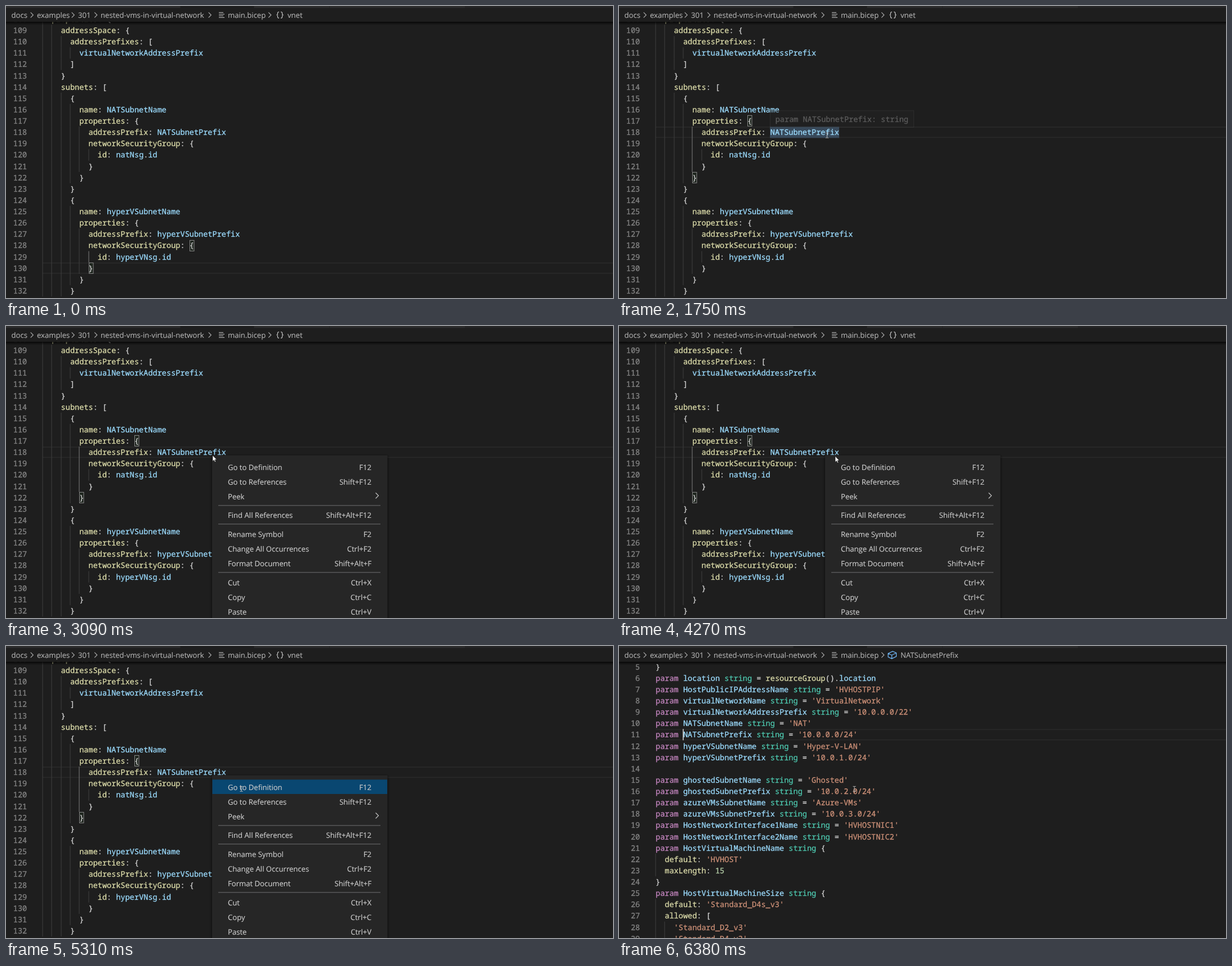
These frames come from a looping animation (1078x519 px, 6870 ms). An HTML page:

```html
<!DOCTYPE html>
<html lang="en">
<head>
<meta charset="utf-8">
<title>Go to definition</title>
<style>
  html, body { margin: 0; width: 100%; height: 100%; overflow: hidden; background: #1e1e1e; }
  svg { display: block; width: 100%; height: 100%; }
  text { white-space: pre; text-rendering: geometricPrecision; }
  .code { font: 13.583px "Noto Sans Mono", "DejaVu Sans Mono", monospace; stroke-width: .3px; }
  .ui { font: 13.1px "Open Sans", "Noto Sans", sans-serif; stroke-width: .15px; }
</style>
</head>
<body>
<svg id="stage" viewBox="0 0 1078 519" preserveAspectRatio="none"></svg>
<script>
const LOOP = 6870, LEFT = 65, CHAR = 8.15, PITCH = 20.13;

const networkCode = `  properties: {
    addressSpace: {
      addressPrefixes: [
        virtualNetworkAddressPrefix
      ]
    }
    subnets: [
      {
        name: NATSubnetName
        properties: {
          addressPrefix: NATSubnetPrefix
          networkSecurityGroup: {
            id: natNsg.id
          }
        }
      }
      {
        name: hyperVSubnetName
        properties: {
          addressPrefix: hyperVSubnetPrefix
          networkSecurityGroup: {
            id: hyperVNsg.id
          }
        }
      }`;

const paramCode = `}
param location string = resourceGroup().location
param HostPublicIPAddressName string = 'HVHOSTPIP'
param virtualNetworkName string = 'VirtualNetwork'
param virtualNetworkAddressPrefix string = '10.0.0.0/22'
param NATSubnetName string = 'NAT'
param NATSubnetPrefix string = '10.0.0.0/24'
param hyperVSubnetName string = 'Hyper-V-LAN'
param hyperVSubnetPrefix string = '10.0.1.0/24'

param ghostedSubnetName string = 'Ghosted'
param ghostedSubnetPrefix string = '10.0.2.0/24'
param azureVMsSubnetName string = 'Azure-VMs'
param azureVMsSubnetPrefix string = '10.0.3.0/24'
param HostNetworkInterface1Name string = 'HVHOSTNIC1'
param HostNetworkInterface2Name string = 'HVHOSTNIC2'
param HostVirtualMachineName string {
  default: 'HVHOST'
  maxLength: 15
}
param HostVirtualMachineSize string {
  default: 'Standard_D4s_v3'
  allowed: [
    'Standard_D2_v3'
    'Standard_D4_v3'`;

const rect = (x, y, w, h, fill, more = '') =>
  `<rect x="${x}" y="${y}" width="${w}" height="${h}" fill="${fill}" ${more}/>`;
// The thin outline gives the type its slightly heavier weight
const label = (x, y, str, color, cls = 'ui', more = '') =>
  `<text class="${cls}" x="${x}" y="${y}" fill="${color}" stroke="${color}" ${more}>${str}</text>`;
const stroke = (d, color, width = 1) =>
  `<path d="${d}" fill="none" stroke="${color}" stroke-width="${width}"/>`;
const group = (id, body) => `<g id="${id}">${body}</g>`;
const colX = col => LEFT + col * CHAR;

function tokenColor(word, next) {
  if (word[0] === "'") return '#ce9178';
  if (word === 'param') return '#c586c0';
  if (word === 'string') return '#4ec9b0';
  if (/^\d/.test(word)) return '#b5cea8';
  if (/^\w/.test(word)) return /[:(]/.test(next) ? '#dcdcaa' : '#9cdcfe';
  return '#d4d4d4';
}

function codeView(source, firstLine, firstY) {
  return source.split('\n').map((line, i) => {
    const mid = firstY + i * PITCH;
    const indent = line.search(/\S/);
    let out = '';
    for (let col = 0; col < indent; col += 2)
      out += rect(Math.round(colX(col)) - 0.5, mid - PITCH / 2, 1, PITCH + 0.1, '#404040');
    out += label(37.2, mid + 4.8, firstLine + i, '#858585', 'code', 'text-anchor="end"');
    for (const m of line.matchAll(/'[^']*'|[A-Za-z_]\w*|\d+|[^\s\w']+/g)) {
      const next = line[m.index + m[0].length] || '';
      out += label(colX(m.index), mid + 4.8, m[0], tokenColor(m[0], next), 'code');
    }
    return out;
  }).join('');
}

const midNet = n => 23.07 + (n - 108) * PITCH;
const midParam = n => 36.8 + (n - 5) * PITCH;

const currentLine = mid =>
  [-10, 8.3].map(d => rect(LEFT, mid + d, 1013, 1.7, '#292929')).join('');
const bracket = (line, col) =>
  rect(Math.round(colX(col)) + 0.5, Math.round(midNet(line) - 10) + 0.5, 7.5, 19, '#1e251e',
    'stroke="#888" stroke-width="1"');
const activeGuide = (col, from, to) =>
  rect(Math.round(colX(col)) - 0.5, midNet(from) - PITCH / 2, 1, (to - from + 1) * PITCH, '#707070');
const chevron = (x, y, h, color) => stroke(`M${x - h / 2} ${y - h}l${h} ${h}l${-h} ${h}`, color, 1.1);

function header() {
  const grey = '#b0b0b0';
  const crumbs = [[9.5, 'docs'], [55, 'examples'], [128, '301'],
    [168, 'nested-vms-in-virtual-network'], [394, 'main.bicep']];
  const brace = 'M485 10.5q-2.6 0-2.6 2.2v1.6q0 1.7-2 1.7q2 0 2 1.7v1.6q0 2.2 2.6 2.2' +
    'M488 10.5q2.6 0 2.6 2.2v1.6q0 1.7 2 1.7q-2 0-2 1.7v1.6q0 2.2-2.6 2.2';
  const cube = 'M478 13.2l8-3.7 6.5 2.8v6.3l-8 3.9-6.5-3zM478 13.2l6.5 3 8-3.9M484.5 16.2v6.3';
  return rect(0, 0, 1078, 28, '#1e1e1e') +
    rect(0, 0, 1078, 3.5, '#252526') +
    rect(0, 0, 309, 3.5, '#2d2d2d') + rect(310, 0, 130, 3.5, '#1e1e1e') +
    rect(441, 0, 133, 3.5, '#2d2d2d') + rect(575, 0, 240, 3.5, '#2d2d2d') +
    rect(0, 28, 1078, 6, 'url(#scroll)') +
    crumbs.map(([x, s]) => label(x, 21, s, grey)).join('') +
    [46, 119, 159.5, 362, 468.5].map(x => chevron(x, 16, 4.6, grey)).join('') +
    stroke('M378 11.5h8M378 14.5h10M378 17.5h8M378 20.5h10', '#c5c5c5', 1.2) +
    group('crumbNet', stroke(brace, '#c5c5c5', 1.2) + label(500, 21, 'vnet', grey)) +
    group('crumbParam', stroke(cube, '#75beff', 1.2) + label(500, 21, 'NATSubnetPrefix', grey));
}

function menu() {
  const items = [[251, 'Go to Definition', 'F12'], [277, 'Go to References', 'Shift+F12'],
    [303, 'Peek', ''], [336.5, 'Find All References', 'Shift+Alt+F12'],
    [370, 'Rename Symbol', 'F2'], [396, 'Change All Occurrences', 'Ctrl+F2'],
    [422.5, 'Format Document', 'Shift+Alt+F'],
    [456, 'Cut', 'Ctrl+X'], [482, 'Copy', 'Ctrl+C'], [508, 'Paste', 'Ctrl+V']];
  return rect(366, 230, 311.5, 320, '#252526', 'filter="url(#drop)"') +
    rect(366.5, 237.5, 310.5, 25.5, '#094771', 'id="picked"') +
    [319, 352, 438].map(y => rect(377, y - 0.7, 288, 1.4, '#5c5c5d')).join('') +
    items.map(([y, name, keys]) => label(394, y + 4.7, name, '#cccccc') +
      label(649, y + 4.7, keys, '#cccccc', 'ui', 'text-anchor="end"')).join('') +
    chevron(659, 301.5, 5, '#cccccc');
}

const stage = document.getElementById('stage');
stage.innerHTML = `<defs>
  <linearGradient id="scroll" x2="0" y2="1">
    <stop stop-color="#000" stop-opacity=".75"/><stop offset="1" stop-color="#000" stop-opacity="0"/>
  </linearGradient>
  <filter id="drop" x="-10%" y="-10%" width="120%" height="120%">
    <feDropShadow dx="0" dy="1.5" stdDeviation="2.5" flood-color="#000" flood-opacity=".8"/>
  </filter></defs>` +
  rect(0, 0, 1078, 519, '#1e1e1e') +
  group('network',
    group('before', currentLine(midNet(130)) + bracket(128, 32) + bracket(130, 10)) +
    group('after', currentLine(midNet(118)) + bracket(117, 20) + bracket(122, 8)) +
    group('hoverWord', rect(268, 214.5, 123, 20, '#38495a')) +
    codeView(networkCode, 108, midNet(108)) +
    group('guideBefore', activeGuide(10, 129, 129)) +
    group('guideAfter', activeGuide(8, 118, 121)) +
    group('caretNet', rect(318.3, 215, 1.7, 19.5, '#c8c8c8'))) +
  group('params',
    currentLine(midParam(11)) +
    group('found', rect(113.5, 147.5, 123, 20, '#613214')) +
    codeView(paramCode, 5, midParam(5)) +
    group('caretParam', rect(113.2, 147.5, 1.7, 20, '#c8c8c8'))) +
  header() +
  group('tip', rect(268.5, 186, 255, 29.5, '#252526', 'stroke="#4a4a4a"') +
    label(277.7, 206, 'param NATSubnetPrefix: string', '#d4d4d4', 'code')) +
  group('menu', menu()) +
  group('beam', stroke('M-2.5-4.5H-.8L0-4L.8-4.5H2.5M0-4V4M-2.5 4.5H-.8L0 4L.8 4.5H2.5', '#b8b8b8')) +
  group('arrow', '<path d="M0 0V10.4L2.4 8.2L4 11.8L5.6 11L4.1 7.6H7.2Z" fill="#fff" stroke="#111" stroke-width=".6"/>');

const el = {};
stage.querySelectorAll('[id]').forEach(n => { el[n.id] = n; });

// Pointer stops: time, x, y
const path = [[150, 539, 502], [380, 350, 360], [580, 197, 240], [680, 230, 217], [830, 316, 224],
  [900, 319, 225], [1060, 431, 255], [1140, 431, 255], [1520, 373, 232], [1600, 369.5, 230],
  [3020, 369.5, 230], [3021, 367, 230], [4269, 367, 230], [4270, 384, 231.5], [4340, 384, 231.5],
  [4660, 418, 254]];

function pointerAt(t) {
  const i = path.findIndex(p => p[0] > t);
  if (i === 0) return path[0].slice(1);
  if (i < 0) return path[path.length - 1].slice(1);
  const [t0, x0, y0] = path[i - 1], [t1, x1, y1] = path[i];
  const k = (t - t0) / (t1 - t0);
  return [x0 + (x1 - x0) * k, y0 + (y1 - y0) * k];
}

const within = (t, ...spans) => spans.some(([a, b]) => t >= a && t < b);
const show = (id, on) => el[id].setAttribute('visibility', on ? 'visible' : 'hidden');
const display = (id, on) => { el[id].style.display = on ? '' : 'none'; };
const fade = (id, k) => el[id].setAttribute('opacity', Math.max(0, Math.min(1, k)));

function draw(t) {
  const jumped = t >= 5370, clicked = t >= 900;
  const arrow = within(t, [3020, 5220]);
  display('network', !jumped);
  display('params', jumped);
  show('crumbNet', !jumped);
  show('crumbParam', jumped);
  for (const id of ['before', 'guideBefore']) show(id, !clicked);
  for (const id of ['after', 'guideAfter']) show(id, clicked);
  show('caretNet', within(t, [900, 1440], [1910, 2390], [2850, 3020]));
  show('hoverWord', within(t, [1750, 3020]));
  display('tip', within(t, [1750, 3020]));
  fade('tip', (t - 1670) / 240);
  display('menu', within(t, [3020, 5370]));
  fade('menu', (t - 2950) / 140);
  show('picked', t >= 4400);
  show('found', t < 5680);
  show('caretParam', !within(t, [5830, 6380]));
  show('arrow', arrow);
  show('beam', t >= 150 && !arrow);
  const [x, y] = pointerAt(t);
  for (const id of ['beam', 'arrow'])
    el[id].setAttribute('transform', `translate(${x.toFixed(2)} ${y.toFixed(2)})`);
}

const start = performance.now();
function tick() {
  draw((performance.now() - start) % LOOP);
  requestAnimationFrame(tick);
}
tick();
</script>
</body>
</html>
```
